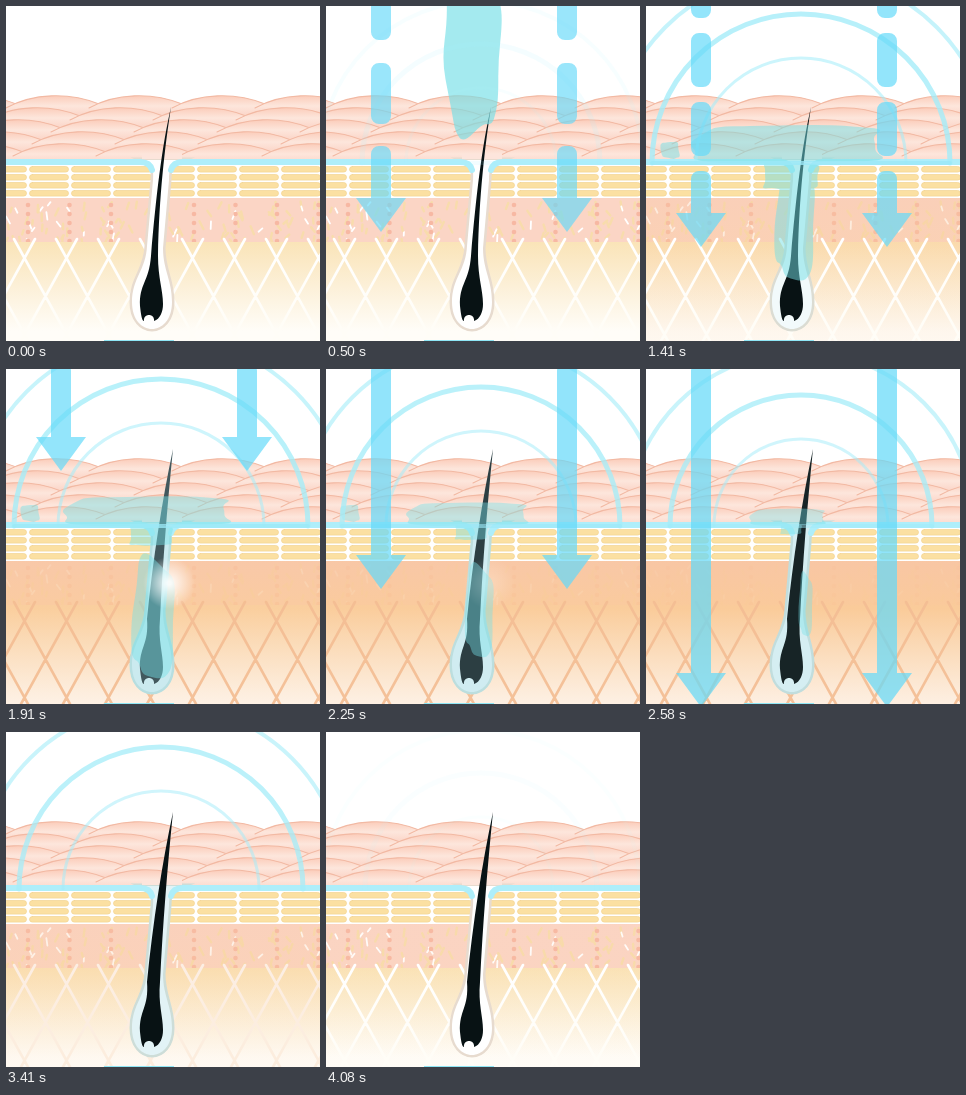
Write an HTML page with a canvas that moves like this. It is 314 by 335 pixels and loops after 4160 ms.

```html
<!DOCTYPE html>
<html>
<head>
<meta charset="utf-8">
<style>
html, body { margin: 0; height: 100%; overflow: hidden; background: #fff; }
canvas { display: block; }
</style>
</head>
<body>
<canvas id="stage" width="314" height="335"></canvas>
<script>
const W = 314, H = 335, LOOP = 4160;
const ctx = document.getElementById('stage').getContext('2d');
const lerp = (a, b, t) => a + (b - a) * t;

// Piecewise linear value: step, value, step, value, ...
function key(k, ...p) {
  if (k <= p[0]) return p[1];
  for (let i = 2; i < p.length; i += 2)
    if (k <= p[i]) return lerp(p[i - 1], p[i + 1], (k - p[i - 2]) / (p[i] - p[i - 2]));
  return p[p.length - 1];
}
const mix = (a, b, t) => `rgb(${a.map((v, i) => Math.round(lerp(v, b[i], t)))})`;

function random(seed) {
  return () => (seed = (seed * 16807) % 2147483647) / 2147483647;
}
function vertical(y0, y1, ...colors) {
  const g = ctx.createLinearGradient(0, y0, 0, y1);
  colors.forEach((c, i) => g.addColorStop(i / (colors.length - 1), c));
  return g;
}
function fillRect(style, x, y, w, h) {
  ctx.fillStyle = style;
  ctx.fillRect(x, y, w, h);
}
function stroke(style, width, path) {
  ctx.strokeStyle = style;
  ctx.lineWidth = width;
  ctx.stroke(path);
}
function withAlpha(a, draw) {
  if (a <= 0) return;
  ctx.save();
  ctx.globalAlpha = a;
  draw();
  ctx.restore();
}

function drawSkin() {
  fillRect('#fce0d4', 0, 99, W, 56);
  for (let row = 0; row < 5; row++) {
    const y = 97 + row * 12;
    for (let x = 5 - row * 19 - 83; x < W; x += 83) {
      const cell = new Path2D();
      cell.moveTo(x - 5, y + 5);
      cell.bezierCurveTo(x + 22, y - 10, x + 58, y - 11, x + 88, y + 1);
      const body = new Path2D(cell);
      body.lineTo(x + 70, y + 15);
      body.lineTo(x - 20, y + 15);
      ctx.fillStyle = vertical(y - 8, y + 14, '#fbcbb8', '#fde6dc', '#fbd3c5');
      ctx.fill(body);
      stroke('#f2b9a3', 1.1, cell);
    }
  }
  fillRect('#fff', 0, 154, W, H - 154);
}

function drawBars() {
  fillRect('#fff', 0, 158, W, 34);
  ctx.fillStyle = '#fbe0a2';
  ctx.strokeStyle = '#f3d493';
  ctx.lineWidth = 0.7;
  for (let x = -20; x < W; x += 42)
    for (let row = 0; row < 4; row++) {
      ctx.beginPath();
      ctx.roundRect(x + 1.5, 160.5 + row * 8, 39, 5.6, 2.8);
      ctx.fill();
      ctx.stroke();
    }
}

function drawTissue(warm) {
  const rnd = random(41);
  fillRect('#fbd5c5', 0, 192, W, 46);
  ctx.lineCap = 'round';
  for (let i = 0; i < 110; i++) {
    const x = rnd() * W, y = 195 + rnd() * 39, dx = rnd() * 8 - 4;
    const line = new Path2D(`M${x} ${y}l${dx} ${3 + rnd() * 5}`);
    stroke(i % 5 ? '#f8dcac' : '#fff', i % 5 ? 2.4 : 1.8, line);
  }
  ctx.fillStyle = '#f7b8a3';
  for (let x = 22; x < W; x += 41.5)
    for (let y = 199; y < 236; y += 9) {
      ctx.beginPath();
      ctx.arc(x, y, 2.3, 0, 7);
      ctx.fill();
    }
  fillRect(vertical(236, 325, '#fae4b8', '#fcf0d8', '#fffdf8'), 0, 236, W, H - 236);
  withAlpha(warm, () =>
    fillRect(vertical(192, 335, '#f8c5a1', '#fac997', '#fbdcbc', '#fdeee0'), 0, 192, W, H - 192));
}

function drawLattice(heat) {
  const lines = new Path2D();
  for (let x = -76; x < W + 80; x += 42) {
    lines.moveTo(x, 233);
    lines.lineTo(x + 56, 335);
    lines.moveTo(x + 21, 233);
    lines.lineTo(x - 35, 335);
  }
  const top = mix([255, 255, 255], [243, 187, 142], heat);
  stroke(vertical(234, 320, top, mix([255, 253, 247], [243, 190, 148], heat)), 2.6, lines);
}

function drawFollicle(tint) {
  const shape = new Path2D(`M138 154C146 157 148 163 147 174L141 240C140 264 126 272 126 296
    C126 332 166 332 166 296C166 274 157 264 157 242L163 174C163 163 165 157 174 154Z`);
  stroke(mix([231, 219, 207], [183, 222, 224], tint), 5, shape);
  ctx.fillStyle = mix([255, 255, 255], [203, 234, 239], tint);
  ctx.fill(shape);
  fillRect('#fde5dc', 136, 148, 40, 5);
  const edge = new Path2D('M0 156H134Q144 156 146 164M314 156H177Q167 156 165 164');
  stroke('#aeeefa', 6, edge);
}

function drawHair(grow, grey) {
  const tipX = 165 + 2 * grow, tipY = 101 - 21 * grow;
  const hair = new Path2D(`M${tipX} ${tipY}
    C156 ${140 - 8 * grow} ${150 - 3 * grow} 190 ${145 - 4 * grow} 250
    C143 276 133 278 134 300C135 309 136 315 138 315
    C137 307 149 307 148 315C154 313 157 306 157 298
    C157 284 152 272 ${152 + 2 * grow} 250
    C${153 + 4 * grow} 190 ${159 + 2 * grow} 140 ${tipX} ${tipY}Z`);
  ctx.fillStyle = mix([8, 18, 20], [66, 88, 93], grey);
  ctx.fill(hair);
}

// Lumpy closed outline inside a box, with a seeded wobble
function addBlob(path, x, y, w, h, seed) {
  if (w <= 0 || h <= 0) return;
  const rnd = random(seed), n = 18, pts = [];
  for (let i = 0; i < n; i++) {
    const a = i / n * Math.PI * 2, r = 0.83 + rnd() * 0.32;
    const squash = v => Math.sign(v) * Math.abs(v) ** 0.6;
    pts.push([x + w / 2 * (1 + squash(Math.cos(a)) * r), y + h / 2 * (1 + squash(Math.sin(a)) * r)]);
  }
  const mid = i => {
    const a = pts[i % n], b = pts[(i + 1) % n];
    return [(a[0] + b[0]) / 2, (a[1] + b[1]) / 2];
  };
  path.moveTo(...mid(0));
  for (let i = 1; i <= n; i++) path.quadraticCurveTo(...pts[i % n], ...mid(i));
}

function drawLiquid(k) {
  const liquid = new Path2D();
  const top = key(k, 6, -20, 11, 140), bottom = key(k, 2, -20, 6, 130, 8, 152);
  addBlob(liquid, 120, top, 57, bottom - top, 77);
  const half = key(k, 6, 0, 12, 95, 17, 105, 23, 92, 31, 42, 36, 10);
  const depth = key(k, 6, 0, 12, 38, 17, 36, 23, 28, 31, 16, 36, 6);
  addBlob(liquid, 142 - half, 156 - depth, half * 2, depth, 913);
  if (k > 10 && k < 30) addBlob(liquid, 15, 135, 19, 18, 5);
  const funnel = key(k, 9, 0, 13, 62, 17, 62, 23, 48, 31, 24, 36, 0);
  addBlob(liquid, 145 - funnel / 2, 154, funnel, funnel / 2, 321);
  const from = key(k, 17, 158, 23, 190, 31, 205), to = key(k, 9, 158, 17, 280, 23, 315, 31, 270);
  const width = key(k, 9, 10, 17, 40, 23, 43, 31, 14, 36, 4);
  addBlob(liquid, key(k, 17, 130, 23, 127, 31, 153), from, width, to - from, 2024);
  withAlpha(key(k, 1, 0, 3, .6, 6, .65, 17, .5, 23, .45, 31, .38, 36, 0), () => {
    ctx.fillStyle = '#74dfe6';
    ctx.fill(liquid);
  });
}

function drawRings(k) {
  const alpha = key(k, 4, 0, 6, .12, 12, .6, 17, .8, 31, .75, 41, .75, 49, .06);
  const radius = key(k, 4, 100, 6, 119, 17, 149, 23, 147, 31, 131, 41, 142, 49, 116);
  withAlpha(alpha, () => {
    [[-44, 3], [0, 5], [43, 4]].forEach(([offset, width], i) => {
      const arc = new Path2D();
      arc.arc(155, 157, radius + offset, Math.PI, 0);
      ctx.globalAlpha = alpha * [.7, 1, .8][i];
      stroke('#a5edf9', width, arc);
    });
    ctx.globalAlpha = alpha * key(k, 23, 1, 31, .6, 38, 0);
    stroke('#9ce9f8', 4, new Path2D(`M${155 - radius} 157H${155 + radius}`));
  });
}

function drawArrow(cx, tip, shafts) {
  ctx.beginPath();
  for (const [y0, y1, r0, r1] of shafts)
    ctx.roundRect(cx - 10, y0, 20, y1 - y0, [r0, r0, r1, r1]);
  ctx.moveTo(cx - 25, tip - 34);
  ctx.lineTo(cx + 25, tip - 34);
  ctx.lineTo(cx, tip);
  ctx.fill();
}

function drawArrows(k) {
  ctx.fillStyle = '#66daf9';
  withAlpha(key(k, 1, 0, 3, .65, 17, .7, 20, 0), () => {
    const tip = key(k, 1, -20, 6, 226, 9, 250, 17, 241);
    const pitch = key(k, 6, 84, 17, 69), dash = key(k, 6, 61, 17, 54);
    const base = tip - key(k, 6, 108, 17, 91);
    const shafts = [[tip - key(k, 6, 86, 17, 76), tip - 34, 8, 0]];
    for (let i = 0; i < 3; i++) shafts.push([base - i * pitch - dash, base - i * pitch, 8, 8]);
    [55, 241].forEach(x => drawArrow(x, tip, shafts));
  });
  if (k < 20) return;
  withAlpha(key(k, 23, .7, 31, .72, 36, 0), () => {
    const tip = key(k, 20, -15, 23, 102, 31, 338);
    [55, 241].forEach(x => drawArrow(x, tip, [[Math.min(-6, tip - 34), tip - 34, 8, 0]]));
  });
}

function drawGlow(k) {
  withAlpha(key(k, 19, 0, 22, .9, 24, .9, 28, 0), () => {
    const g = ctx.createRadialGradient(163, 214, 2, 163, 214, 26);
    g.addColorStop(0, '#fff');
    g.addColorStop(1, '#fff0');
    fillRect(g, 130, 185, 70, 60);
  });
}

function draw(k) {
  fillRect('#fff', 0, 0, W, H);
  drawSkin();
  drawBars();
  drawTissue(key(k, 6, 0, 17, .35, 23, .8, 31, .92, 36, .55, 41, .25, 49, .08));
  drawLattice(key(k, 17, 0, 22, .95, 31, .95, 41, .25, 49, 0));
  drawFollicle(key(k, 15, 0, 23, 1, 31, .8, 41, .55, 49, 0));
  drawHair(key(k, 17, 0, 22, 1), key(k, 18, 0, 23, 1, 31, .25, 41, 0));
  drawLiquid(k);
  drawGlow(k);
  drawRings(k);
  drawArrows(k);
  fillRect('#8fe6f5', 98, 334, 70, 1);
}

function tick() {
  const t = performance.now() % LOOP;
  draw(Math.min(49, Math.floor((t + 7) * 12 / 1000)));
  requestAnimationFrame(tick);
}
tick();
</script>
</body>
</html>
```
